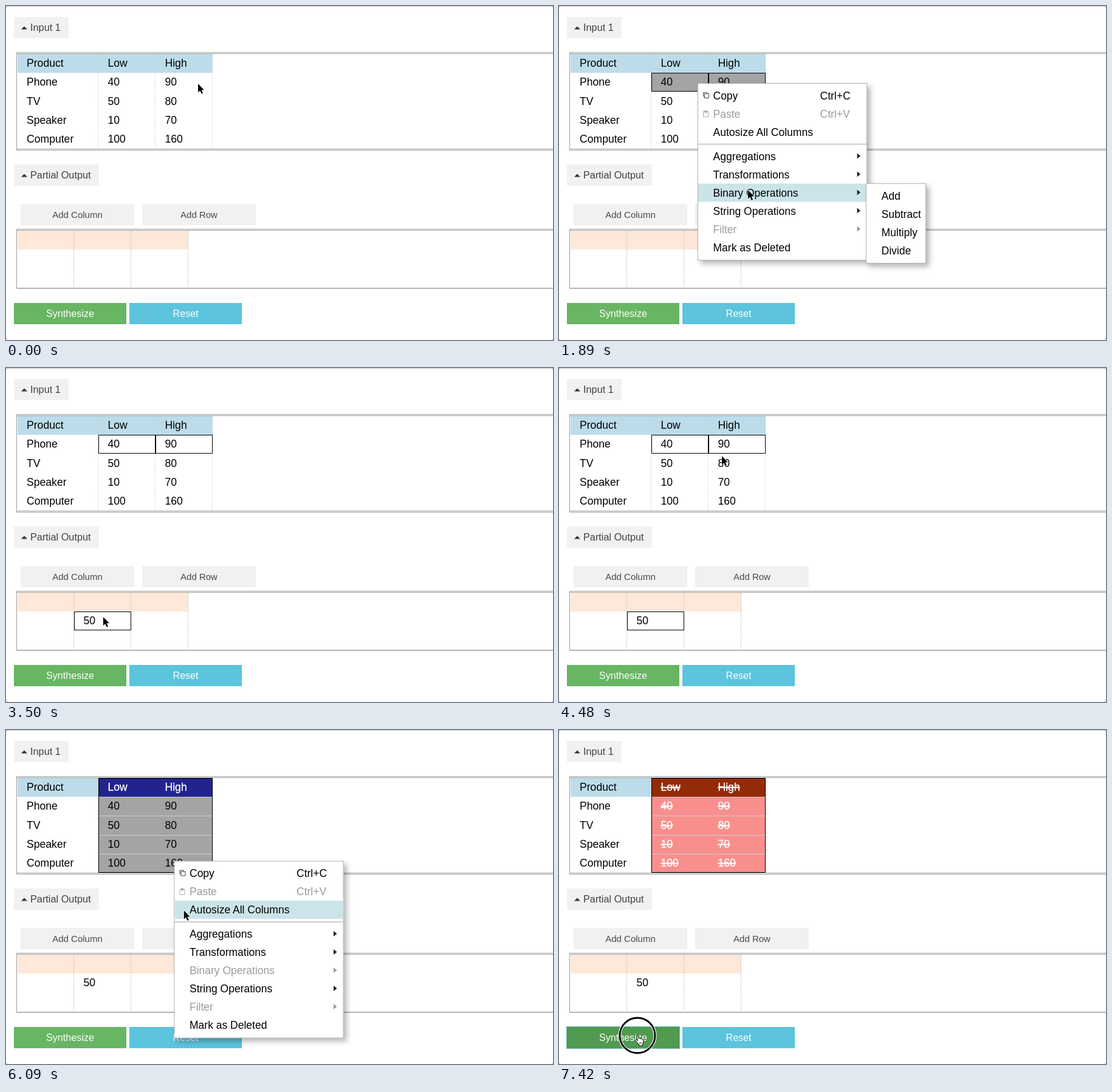
Recreate the animation shown at these times as an HTML page. Size 900 by 550 pixels, loop 7.49 s.

```html
<!DOCTYPE html>
<html lang="en">
<head>
<meta charset="utf-8">
<title>Table demonstration</title>
<style>
html, body { margin: 0; width: 100%; height: 100%; overflow: hidden; background: #fff; }
svg { display: block; width: 900px; height: 550px; }
text { font-family: "Liberation Sans", Arial, sans-serif; white-space: pre; }
</style>
</head>
<body>
<svg id="stage" viewBox="0 0 900 550" xmlns="http://www.w3.org/2000/svg"></svg>
<script>
const LOOP = 7490, STEP = 70;
const stage = document.getElementById('stage');

const rect = (x, y, w, h, fill, extra = '') =>
  `<rect x="${x}" y="${y}" width="${w}" height="${h}" fill="${fill}" ${extra}/>`;
const path = (d, stroke, width = 1, fill = 'none', extra = '') =>
  `<path d="${d}" stroke="${stroke}" stroke-width="${width}" fill="${fill}" ${extra}/>`;
const text = (s, x, y, size, fill = '#000', extra = '') =>
  `<text x="${x}" y="${y}" font-size="${size}" fill="${fill}" ${extra}>${s}</text>`;
const during = (t, a, b) => t >= a && t < b;

// Pointer stops: time, x, y
const STOPS = [
  [0, 316, 128], [140, 316, 128], [700, 227, 127], [980, 227, 127],
  [1190, 250, 150], [1260, 250, 150], [1330, 266, 167], [1750, 300, 303],
  [1820, 300, 303], [2310, 500, 309], [2590, 530, 345], [2660, 530, 345],
  [3220, 160, 410], [4200, 160, 410], [4480, 268, 145], [4900, 212, 119],
  [4970, 205, 97], [5390, 251, 197], [5670, 276, 215], [5880, 276, 215],
  [6440, 329, 475], [6510, 329, 475], [7210, 128, 502], [LOOP, 128, 502]
];

function pointerAt(t) {
  let i = 0;
  while (i < STOPS.length - 2 && t >= STOPS[i + 1][0]) i++;
  const [a, ax, ay] = STOPS[i], [b, bx, by] = STOPS[i + 1];
  const u = (t - a) / (b - a), e = u * u * (3 - 2 * u);
  return { x: ax + (bx - ax) * e, y: ay + (by - ay) * e };
}

// Press and release times
const PRESSES = [[140, 700], [980, 1050], [2520, 2590], [3220, 3290],
  [4970, 5600], [5740, 5810], [6510, 6510], [7280, 7350]];

const TABLE = [['Product', 'Low', 'High'], ['Phone', 40, 90], ['TV', 50, 80],
  ['Speaker', 10, 70], ['Computer', 100, 160]];
const COL = [19, 152, 246, 340];
const TEXT_X = [34, 167.5, 261.5];
const rowY = i => Math.round(79 + 31.2 * i);

function heading(label, y, w) {
  return rect(13, y, w, 35, '#f1f1f1') +
    path(`M25 ${y + 20.5}l5 -5l5 5z`, 'none', 0, '#333') +
    text(label, 40, y + 23, 16.3, '#404040');
}

function button(label, x, y, w, fill, color, size) {
  return rect(x, y, w, 35, fill) +
    text(label, x + w / 2, y + 23, size, color, 'text-anchor="middle"');
}

function page() {
  const line = '#9c9c9c';
  const dots = (x, a, b, dash) =>
    path(`M${x} ${a}V${b}`, '#c8c8c8', 1, 'none', `stroke-dasharray="${dash}"`);
  return rect(0, 0, 900, 550, '#c4c4c4') + rect(0, 1, 900, 549, '#fff', 'rx="4"') +
    heading('Input 1', 18, 90) + heading('Partial Output', 261, 140) +
    button('Add Column', 24, 326, 187, '#f1f1f1', '#484848', 15) +
    button('Add Row', 224, 326, 187, '#f1f1f1', '#484848', 15) +
    path('M900 76.5H17.5V237.5H900M18 78.5H900M18 235.5H900', line) +
    path('M900 367.5H17.5V465H900M18 369.5H900M18 464.5H900', line) +
    rect(19, 79, 321, 31, '#bddcea') + rect(19, 370, 281, 31, '#fee8d9') +
    [151.5, 245.5, 339.5].map(x => dots(x, 79, 235, '1 1.5')).join('') +
    [111.5, 205.5, 299.5].map(x => dots(x, 370, 463, '2 1')).join('') +
    button('Reset', 203, 489, 185, '#5cc4dd', '#fff', 16);
}

function selectedColumns(head, body) {
  let s = rect(152, 79, 188, 31, head) + rect(152, 110, 188, 125, body);
  for (let i = 1; i < 5; i++) s += path(`M153 ${rowY(i) + .5}H339`, '#cfcfcf');
  return s + path('M152.5 79.5H339.5V234.5H152.5Z', '#000');
}

function inputTable(t, p) {
  const marked = t >= 6580, columns = t >= 5670;
  let s = '';
  if (t < 4970) {
    const gray = during(t, 700, 3290), both = during(t, 420, 3290) || t >= 3500;
    const fill = gray ? '#a4a4a4' : '#fff';
    if (both) s += rect(152.5, 110.5, 93, 30, fill, 'stroke="#000"');
    if (both || during(t, 140, 420)) s += rect(246.5, 110.5, 93, 30, fill, 'stroke="#000"');
  } else if (!columns) {
    const right = p.x >= 246 ? 339.5 : 245.5;
    const rows = Math.max(1, Math.min(5, Math.ceil((p.y - 79) / 31.2)));
    s += rect(152, 79, 94, 31, '#23238e');
    for (let i = 0; i < rows; i++) {
      const a = rowY(i) + (i ? 1 : 0), b = rowY(i + 1) - 1;
      s += path(`M152.5 ${a}V${b}M${right} ${a}V${b}`, '#000');
    }
    const bottom = rowY(rows) - .5;
    s += path(`M152 79.5H${right}M152 ${bottom}H${right + .5}`, '#000');
  } else {
    s += marked ? selectedColumns('#932b06', '#f88f8d') : selectedColumns('#23238e', '#a4a4a4');
  }
  TABLE.forEach((row, r) => row.forEach((value, c) => {
    const bright = c && (marked || (r === 0 && (columns || (t >= 4970 && c === 1))));
    const style = bright
      ? 'stroke="#fff" stroke-width=".3"' + (marked ? ' text-decoration="line-through"' : '') : '';
    s += text(value, TEXT_X[c], Math.round(100 + 31.25 * r), 17.6, bright ? '#fff' : '#000', style);
  }));
  return s;
}

function outputTable(t) {
  let s = '';
  if (during(t, 3220, 4970)) s += rect(112.5, 401.5, 93, 30, '#fff', 'stroke="#000"');
  if (during(t, 4970, 5740)) s += path('M205 401.5H112.5V431.5H205', '#555');
  if (t >= 3500) s += text('50', 127.5, 422, 17.6);
  return s;
}

const ITEMS = ['Copy', 'Paste', 'Autosize All Columns', 'Aggregations', 'Transformations',
  'Binary Operations', 'String Operations', 'Filter', 'Mark as Deleted'];
const itemY = i => 20.5 + 30 * i + (i > 2 ? 10 : 0);

const panel = (x, y, w, h) =>
  rect(x + .5, y + .5, w, h, '#fff', 'stroke="#b4b4b4" filter="url(#shadow)"');

function menu(x, y, p, disabled) {
  let hot = -1;
  ITEMS.forEach((_, i) => {
    if (!disabled.includes(i) && p.y - y >= itemY(i) - 15) hot = i;
  });
  let s = panel(0, 0, 278, 291);
  if (hot >= 0) s += rect(1, itemY(hot) - 15, 277, 30, '#cbe4e9');
  s += path('M1 100.5H278', '#bcbcbc', 1.5);
  ITEMS.forEach((label, i) => {
    const c = itemY(i), color = disabled.includes(i) ? '#9b9b9b' : '#000';
    s += text(label, 25.5, c + 6, 17.5, color);
    if (i < 2) s += text(i ? 'Ctrl+V' : 'Ctrl+C', 201.5, c + 6, 17.5, color);
    if (i > 2 && i < 8) s += path(`M262.5 ${c - 5}v9l5.5 -4.5z`, 'none', 0, i === 7 || color !== '#000' ? '#9b9b9b' : '#222');
  });
  s += path('M11.5 21.5H9.5V15.5H15.5V17.5M11.5 17.5H18.5V24.5H11.5Z', '#444') +
    path('M9.5 46.5H17.5V55.5H9.5Z', '#aaa') + rect(11.5, 45, 4, 4, '#aaa');
  return `<g transform="translate(${x} ${y})">${s}</g>`;
}

function submenu(p) {
  const x = 505, y = 292;
  const hot = p.x >= x ? Math.floor((p.y - y - 6) / 30) : -1;
  let s = panel(x, y, 98, 131);
  if (hot >= 0) s += rect(x + 1, y + 6 + hot * 30, 97, 30, '#cbe4e9');
  ['Add', 'Subtract', 'Multiply', 'Divide'].forEach((label, i) => {
    s += text(label, x + 25.5, y + 27 + i * 30, 17.5);
  });
  return s;
}

function synthesize(t, p) {
  const over = t > 6580 && p.y >= 489 && p.x < 198;
  return button('Synthesize', 13, 489, 185, over ? '#519a50' : '#68b563', '#fff', 16.2) +
    (t >= 7280 ? rect(12.5, 488.5, 186, 36, 'none', 'stroke="#70b9c4"') : '');
}

function pointer(t, p) {
  const x = p.x.toFixed(1), y = p.y.toFixed(1);
  let s = '';
  for (const [down, up] of PRESSES) {
    if (up > down && during(t, down, up + 140)) {
      const r = 20.5 + Math.max(0, t - up) * 8.5 / 70;
      const ring = (color, w) =>
        `<circle cx="1" cy="1" r="${r}" fill="none" stroke="${color}" stroke-width="${w}"/>`;
      s += ring('#fff', 5) + ring('#000', 2.8);
    }
  }
  const hand = t > 6580 && p.y >= 489 && p.x < 198;
  s += hand
    ? path('M0 2.2C0 .5 2.4 .5 2.7 2.2L3.4 6.2C4.4 5 5.8 5.4 6 6.6C7 5.7 8.3 6.2 8.5 7.3C9.6 6.7 10.7 7.4 10.8 8.7C11 12 10.2 14 9.2 15.8V18H3.8V16.2C2.3 14.6 .8 12.5 -1.8 9.8C-2.7 8.4 -.8 7.5 .2 8.6L1.4 9.8Z', '#000', 1, '#fff') +
      path('M5 12V15M7.2 12V15', '#000', .8)
    : path('M0 0V14.2L3.2 11.2L5.6 16.6L8 15.5L5.6 10.3H10Z', '#fff', 1.2, '#000', 'paint-order="stroke"');
  return `<g transform="translate(${x} ${y})">${s}</g>`;
}

const DEFS = '<defs><filter id="shadow" x="-20%" y="-20%" width="150%" height="150%">' +
  '<feDropShadow dx="5" dy="5" stdDeviation="5" flood-color="#000" flood-opacity=".3"/></filter></defs>';

function draw(t) {
  const p = pointerAt(t);
  let s = DEFS + page() + synthesize(t, p) + inputTable(t, p) + outputTable(t);
  if (during(t, 1050, 2660)) s += menu(228, 127, p, [1, 7]);
  if (during(t, 1890, 2660)) s += submenu(p);
  if (during(t, 5810, 6580)) s += menu(276.5, 215.5, p, [1, 5, 7]);
  stage.innerHTML = s + pointer(t, p);
}

const start = performance.now();
let shown = -1;
function tick() {
  const now = Math.max(0, performance.now() - start) % LOOP;
  const t = Math.floor(now / STEP) * STEP;
  if (t !== shown) draw(shown = t);
  requestAnimationFrame(tick);
}
tick();
</script>
</body>
</html>
```
